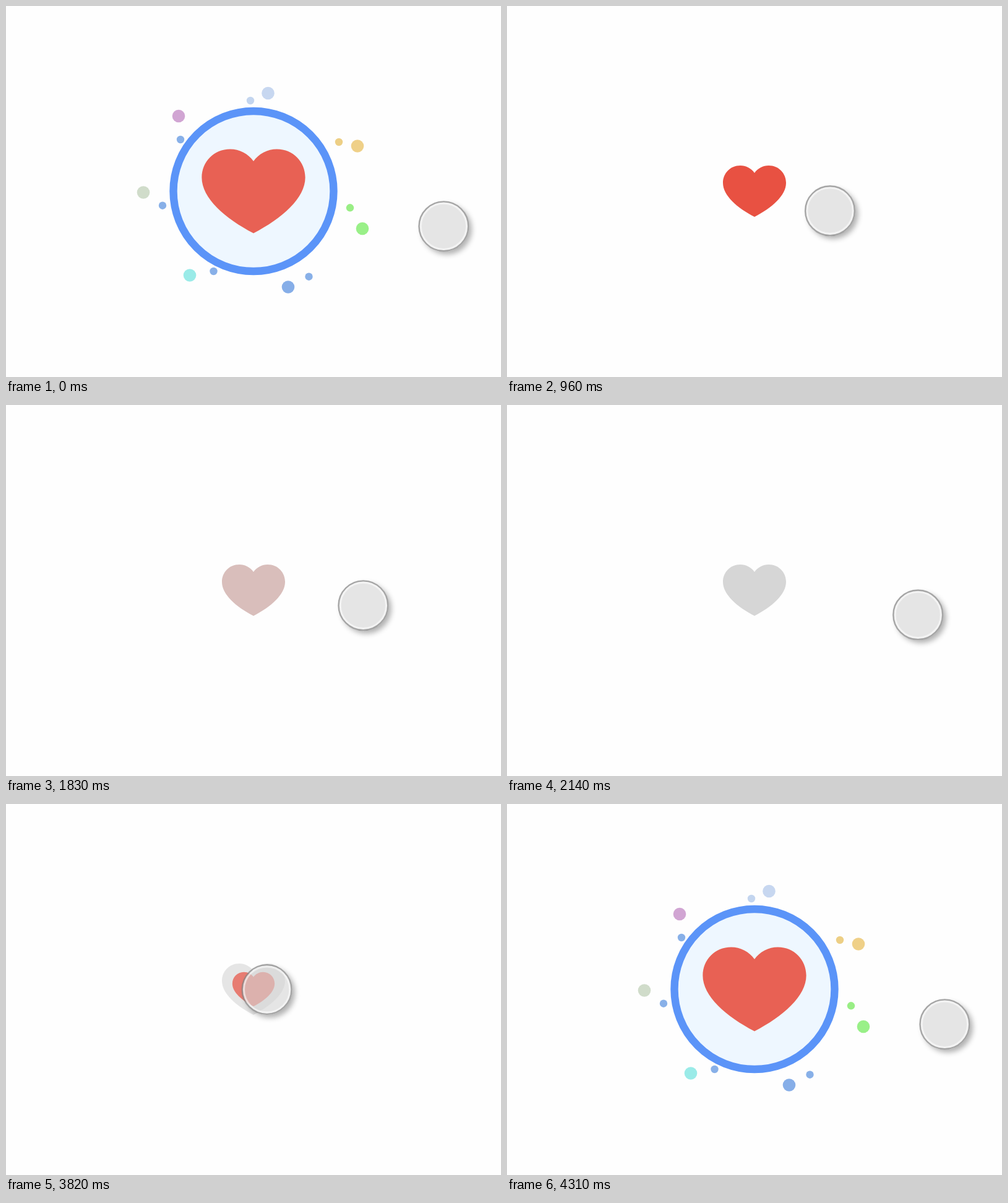
Recreate the animation shown at these times as an HTML page with a canvas. Size 800 px wide and 600 px high, loop 4340 ms.

```html
<!DOCTYPE html>
<html lang="en">
<head>
<meta charset="utf-8">
<title>Like button</title>
<style>
  html, body { margin: 0; width: 100%; height: 100%; overflow: hidden; background: #fefefe; }
  canvas { display: block; }
</style>
</head>
<body>
<canvas id="stage" width="800" height="600"></canvas>
<script>
const ctx = document.getElementById('stage').getContext('2d');
const LOOP = 4340;
const CENTER = { x: 400, y: 299.5 };
const RED = '#e85142', GRAY = '#d6d6d6', BLUE = '#5b94f8', PALE = '#eef7ff';

// Keys are [time, value]; the curve is smooth and never overshoots a key.
function track(keys, t) {
  const last = keys.length - 1;
  if (t <= keys[0][0]) return keys[0][1];
  if (t >= keys[last][0]) return keys[last][1];
  const slope = i => (keys[i + 1][1] - keys[i][1]) / (keys[i + 1][0] - keys[i][0]);
  const tangent = i => {
    if (i === 0 || i === last) return 0;
    const a = slope(i - 1), b = slope(i);
    return a * b > 0 ? 2 * a * b / (a + b) : 0;
  };
  let i = 0;
  while (t > keys[i + 1][0]) i++;
  const [t0, v0] = keys[i], [t1, v1] = keys[i + 1];
  const d = t1 - t0, u = (t - t0) / d, w = 1 - u;
  return v0 * w * w * (1 + 2 * u) + v1 * u * u * (3 - 2 * u)
    + d * u * w * (tangent(i) * w - tangent(i + 1) * u);
}

const ramp = (t, from, to) => Math.min(1, Math.max(0, (t - from) / (to - from)));

// Pointer path: time, x, y
const pointer = [
  [600, 707.4, 356.3], [960, 522, 331.2], [1110, 459, 315], [1260, 437, 309.5],
  [1500, 427, 307], [1570, 427, 307], [2040, 686.5, 338.5], [2140, 664.2, 339.4],
  [2700, 664.2, 339.4], [3120, 488.3, 314.3], [3260, 443, 303.5], [3500, 421.6, 300],
  [3820, 421.6, 300], [4270, 707.4, 356.3]
];
const pointerX = pointer.map(([t, x]) => [t, x]);
const pointerY = pointer.map(([t, , y]) => [t, y]);

const heartScale = [[3680, 0], [3820, 0.67], [4260, 1.64], [4370, 1.64], [4760, 1]];
const heartAlpha = [[3680, 0], [3820, 0.7], [4310, 0.9], [4370, 0.9], [4600, 1]];
const ringOuter = [[3860, 0], [4200, 135.7], [4370, 135.7]];
const ringInner = [[3950, 0], [4260, 123.3], [4370, 123.3], [4640, 135.7]];
const spread = [[4060, 0.55], [4310, 1], [4370, 1], [4760, 1.13]];

// Sparkles: x, y, radius, color
const sparkles = [
  [423.5, 141, 10.3, '#c7d7f0'], [568, 226.5, 10.3, '#efd088'],
  [576, 360, 10.3, '#99f088'], [456, 454.5, 10.3, '#86aee8'],
  [297, 435.5, 10.3, '#9aebe8'], [222, 301.5, 10.3, '#d0dcca'],
  [279, 178, 10.3, '#d1a5d3'],
  [395, 153, 6.2, '#c3d5ef'], [538, 220, 6.2, '#edcf85'],
  [556, 326.3, 6.2, '#99ee85'], [489.5, 437.7, 6.2, '#88b0e8'],
  [335.5, 429, 6.2, '#88b0e8'], [253, 322.7, 6.2, '#88b0e8'],
  [282, 216, 6.2, '#88b0e8']
];

function disc(x, y, r, color) {
  ctx.fillStyle = color;
  ctx.beginPath();
  ctx.arc(x, y, Math.max(0, r), 0, Math.PI * 2);
  ctx.fill();
}

function circleLine(x, y, r, width, color) {
  ctx.strokeStyle = color;
  ctx.lineWidth = width;
  ctx.beginPath();
  ctx.arc(x, y, r, 0, Math.PI * 2);
  ctx.stroke();
}

function heart(scale, color, alpha) {
  if (scale <= 0 || alpha <= 0) return;
  ctx.save();
  ctx.translate(CENTER.x, CENTER.y);
  ctx.scale(scale, scale);
  ctx.globalAlpha = alpha;
  ctx.fillStyle = color;
  ctx.beginPath();
  ctx.moveTo(0, 41.5);
  ctx.bezierCurveTo(-28, 27, -51, 7, -51, -13.5);
  ctx.bezierCurveTo(-51, -29, -39, -41.5, -23, -41.5);
  ctx.bezierCurveTo(-14, -41.5, -5, -37, 0, -29.5);
  ctx.bezierCurveTo(5, -37, 14, -41.5, 23, -41.5);
  ctx.bezierCurveTo(39, -41.5, 51, -29, 51, -13.5);
  ctx.bezierCurveTo(51, 7, 28, 27, 0, 41.5);
  ctx.fill();
  ctx.restore();
}

function ring(t) {
  const outer = track(ringOuter, t), inner = track(ringInner, t);
  if (outer <= 0 || t >= 4640) return;
  const { x, y } = CENTER;
  ctx.globalAlpha = 1 - ramp(t, 4370, 4600);
  disc(x, y, inner, PALE);
  ctx.globalAlpha = 1 - ramp(t, 4430, 4640);
  if (outer > inner) circleLine(x, y, (outer + inner) / 2, outer - inner, BLUE);
  ctx.globalAlpha = 1;
}

function drawSparkles(t) {
  if (t < 4060 || t >= 4760) return;
  const k = track(spread, t);
  ctx.globalAlpha = ramp(t, 4060, 4200) * (1 - ramp(t, 4370, 4760));
  for (const [x, y, r, color] of sparkles) {
    disc(CENTER.x + (x - CENTER.x) * k, CENTER.y + (y - CENTER.y) * k, r, color);
  }
  ctx.globalAlpha = 1;
}

function drawPointer(x, y) {
  // The shadow falls only outside the translucent disc.
  ctx.save();
  ctx.beginPath();
  ctx.rect(0, 0, 800, 600);
  ctx.arc(x, y, 41, 0, Math.PI * 2);
  ctx.clip('evenodd');
  ctx.shadowColor = 'rgba(0,0,0,0.3)';
  ctx.shadowBlur = 8;
  ctx.shadowOffsetX = ctx.shadowOffsetY = 5;
  disc(x, y, 40.5, '#aaa');
  ctx.restore();

  disc(x, y, 40, 'rgba(214,214,214,0.6)');
  circleLine(x, y, 37.3, 3.4, 'rgba(255,255,255,0.55)');
  circleLine(x, y, 39.9, 2.4, 'rgba(125,125,125,0.65)');
}

function draw(t) {
  // The burst runs across the loop seam.
  const burst = t < 600 ? t + LOOP : t;
  ctx.fillStyle = '#fefefe';
  ctx.fillRect(0, 0, 800, 600);

  if (burst < 3680) {
    const off = ramp(t, 1500, 1900);
    heart(1, GRAY, off > 0 ? 1 : 0);
    heart(1, RED, 1 - off);
  } else {
    heart(1, GRAY, 1 - ramp(burst, 3680, 4030));
    ring(burst);
    drawSparkles(burst);
    heart(track(heartScale, burst), RED, track(heartAlpha, burst));
  }
  drawPointer(track(pointerX, t), track(pointerY, t));
}

// Steps of 30 ms first, then of 70 ms.
function step(t) {
  return t < 2070 ? Math.floor(t / 30) * 30 : 2070 + Math.floor((t - 2070) / 70) * 70;
}

let start = null;
function tick(now) {
  if (start === null) start = now;
  draw(step(Math.max(0, now - start) % LOOP));
  requestAnimationFrame(tick);
}
draw(0);
requestAnimationFrame(tick);
</script>
</body>
</html>
```
